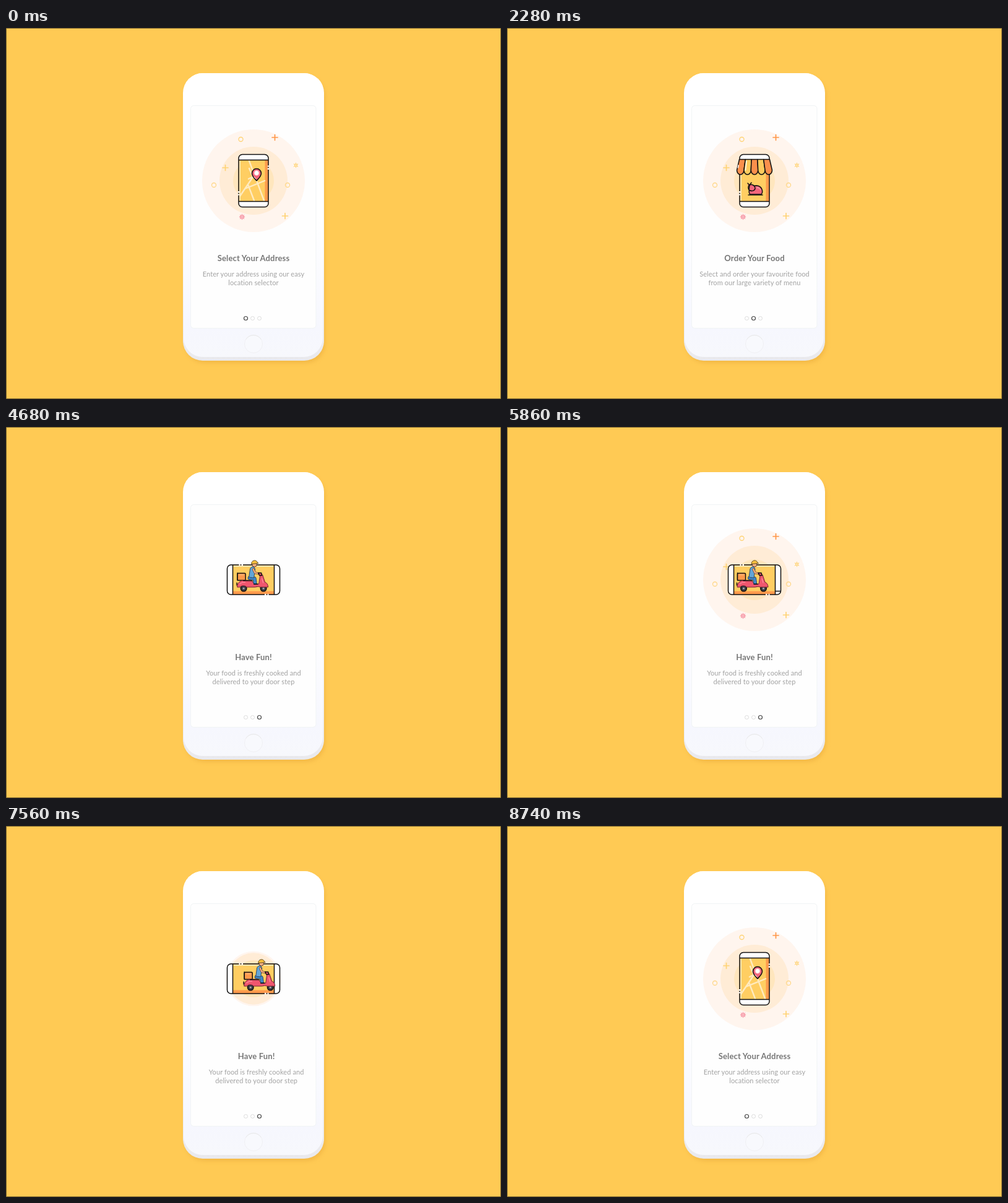
An HTML page for the animation above (10 s loop, 800 px wide and 600 px high).

```html
<!DOCTYPE html>
<html lang="en">
<head>
<meta charset="utf-8">
<title>Food onboarding</title>
<style>
html, body { margin: 0; width: 100%; height: 100%; overflow: hidden; background: #ffca54; }
svg { display: block; width: 100vw; height: 100vh; }
text { font-family: Comfortaa, Lato, sans-serif; text-anchor: middle; }
.title { font-size: 13px; font-weight: 700; fill: #777; letter-spacing: .15px; }
.body { font-size: 11px; fill: #a2a2a2; letter-spacing: .1px; }
.ink { stroke: #111; stroke-width: 1.5; stroke-linejoin: round; stroke-linecap: round; }
.line { fill: none; stroke-linecap: round; stroke-linejoin: round; }
</style>
</head>
<body>
<svg viewBox="0 0 800 600">
  <defs>
    <linearGradient id="rim" x2="0" y2="1">
      <stop offset="0" stop-color="#fff"/><stop offset=".6" stop-color="#fafafc"/><stop offset="1" stop-color="#e9e9ed"/>
    </linearGradient>
    <linearGradient id="face" x2="0" y2="1">
      <stop offset=".5" stop-color="#fff"/><stop offset=".9" stop-color="#f6f7fe"/><stop offset="1" stop-color="#f7f8fc"/>
    </linearGradient>
    <filter id="blur" x="-10%" y="-10%" width="120%" height="120%"><feGaussianBlur stdDeviation="3"/></filter>
    <clipPath id="textClip"><rect x="310" y="355" width="180" height="70"/></clipPath>
    <clipPath id="rideClip"><rect x="357" y="180" width="86" height="91"/></clipPath>
  </defs>

  <rect width="800" height="600" fill="#ffca54"/>
  <rect x=".5" y=".5" width="799" height="599" fill="none" stroke="#7d652e"/>

  <rect x="289" y="79" width="227" height="463" rx="32" fill="#e8a93a" opacity=".5" filter="url(#blur)"/>
  <rect x="286" y="73" width="228" height="465" rx="32" fill="url(#rim)"/>
  <rect x="287" y="73" width="225" height="459" rx="31" fill="url(#face)"/>
  <rect x="298.5" y="125.5" width="202.5" height="360" rx="5" fill="#fefefe" stroke="#f1f4f5"/>
  <circle cx="400" cy="511" r="14.5" fill="#f8f9fd" stroke="#f0f0f4"/>
  <path class="line" d="M388 503a14.5 14.5 0 0 1 24 0" stroke="#e9e9ea"/>

  <g id="halo">
    <circle cx="400" cy="247" fill="#fff5ee"/>
    <circle cx="400" cy="247" fill="#ffecd6"/>
    <circle cx="400" cy="247" fill="#ffe6bd"/>
  </g>
  <g id="sparks"></g>

  <g id="device">
    <rect x="-24" y="-42.5" width="48" height="85" rx="6" fill="#fff"/>
    <path d="M-24-33H24V33H-24z" fill="#ffce62"/>
    <path d="M18.500-33H24V33H18.500z" fill="#ff9a4c"/>
    <path d="M-22-32V32" stroke="#fff0cf" stroke-width="1.500"/>
    <path id="roads" class="line" stroke="#ffebc0" stroke-width="2.400" stroke-linecap="butt"
      d="M-7-32L17 32M-22 25L-1-6L-7-20M-14 13L18 0M-9 6L1 32M2-8L-8-3"/>
    <g class="ink" fill="none">
      <rect x="-24" y="-42.500" width="48" height="85" rx="6"/>
      <path d="M-23.500-33.500H23.500M-23.500 33.500H23.500"/>
    </g>
    <path d="M-24 17v2.500M-24 21.500v2M24-18v-2.500M24-22.500v-2" stroke="#fff" stroke-width="2.600"/>
  </g>

  <g id="pin">
    <path class="ink" fill="#f4667c" d="M405 247c-3-3.500-7.500-7-7.500-12a7.500 7.500 0 0 1 15 0c0 5-4.500 8.500-7.500 12z"/>
    <circle cx="405" cy="234.500" r="4" fill="#fff" stroke="#f9a9b4"/>
    <path class="line" d="M401 241l3 3" stroke="#fff" stroke-width="1"/>
  </g>

  <g id="awning" class="ink"></g>

  <g id="roast">
    <path class="ink" fill="#f4667c" d="M392 268c-2-4 0-9 5-11c5-4 13-2 15 4c1 3 1 6-1 8h-18z"/>
    <path class="ink" fill="#f4667c" d="M391 262c-2-4-1-7 1-8l-3-3m3 3l3-4m-3 4c4-2 9 1 9 5c0 4-5 6-10 3z"/>
    <path class="ink" d="M390 270H413" fill="none"/>
    <path class="line" d="M404 258c3 0 5 2 6 4" stroke="#ffc0c8"/>
  </g>

  <g clip-path="url(#rideClip)">
    <path id="dash" class="ink" d="M0 265.500h11"/>
    <g id="scooter">
      <path class="ink" fill="none" d="M374.500 236v12M373.500 252v4" stroke-width="1"/>
      <rect class="ink" x="374.500" y="236.500" width="13" height="11.500" rx="1.500" fill="#ff9a4c"/>
      <path d="M377 239h8" stroke="#ffc48d"/>
      <g fill="#3c3a44" class="ink"><circle cx="384.500" cy="261" r="4.800"/><circle cx="416.500" cy="261" r="4.800"/></g>
      <g fill="#aaa"><circle cx="384.500" cy="261" r="1.600"/><circle cx="416.500" cy="261" r="1.600"/></g>
      <path d="M374 259c0-7 5-11 11-11h12l5 6h7l2-14l4-1l4 12c3 1 5 4 5 8h-13l-3-1l-5 1h-14c-1-3-9-3-10 0z"
        fill="#f0566e" stroke="#6e2533" stroke-linejoin="round"/>
      <path d="M378 254q4-4 9-3M414 245l2 7" class="line" stroke="#ff9fae"/>
      <path d="M384 248.500h14" class="ink"/>
      <path class="line" stroke="#233c5c" stroke-width="6" d="M394 244l8 1l1 7"/>
      <path class="line" stroke="#3f86c4" stroke-width="4.500" d="M394 244l8 1l1 7"/>
      <path d="M401 254h6" class="ink" stroke-width="2.200"/>
      <path d="M393 243l2-14q2-4 6-3l2 4l-2 14z" fill="#62a5d8" stroke="#334a60"/>
      <path class="line" d="M400 230l3 6l6 1" stroke="#6a402b" stroke-width="3.600"/>
      <path class="line" d="M400 230l3 6l6 1" stroke="#f6b184" stroke-width="2.200"/>
      <path class="ink" d="M408 236h5l1 4h-4z" fill="#f0566e" stroke-width="1"/>
      <circle cx="402" cy="222.500" r="3.700" fill="#f6b184" stroke="#5a3a2b"/>
      <path d="M397 221.500c0-7 9-7 9.500-2.500l2 1.500z" fill="#ffc23e" stroke="#5e4a20"/>
    </g>
  </g>

  <g id="texts" clip-path="url(#textClip)"></g>
  <g id="dots" fill="none"></g>
</svg>
<script>
const $ = id => document.getElementById(id);
const LOOP = 10000;

// Symmetric power easing from 0 to 1 between two times.
function ramp(t, start, length, power = 2) {
  const u = Math.min(1, Math.max(0, (t - start) / length));
  return u < .5 ? Math.pow(2 * u, power) / 2 : 1 - Math.pow(2 - 2 * u, power) / 2;
}
const show = (el, on) => el.setAttribute('visibility', on ? 'visible' : 'hidden');
function zoom(el, x, y, s) {
  show(el, s > .001);
  el.setAttribute('transform', `translate(${x} ${y}) scale(${s}) translate(${-x} ${-y})`);
}

// Decorations: shape, centre, colour.
const YELLOW = '#ffd375';
const sparks = [
  ['ring', 379.5, 180, YELLOW], ['plus', 434.5, 177, '#ff9748'],
  ['flower', 468.5, 222, YELLOW], ['plus', 354.5, 226, YELLOW],
  ['ring', 336, 254, '#ffd88a'], ['ring', 455, 254, '#ffd88a'],
  ['star', 381.5, 305.5, '#f58a9c'], ['plus', 451, 304, YELLOW]
];
const shapes = {
  ring: 'M-3.5 0a3.500 3.500 0 1 0 7 0a3.500 3.500 0 1 0-7 0',
  plus: 'M-4.500 0h9M0-4.500v9',
  flower: 'M-1.600 0a1.600 1.600 0 1 0 3.200 0a1.600 1.600 0 1 0-3.200 0M0-3.500v1.500M0 3.500v-1.500M-3-2l1 .7M3-2l-1 .7M-3 2l1-.7M3 2l-1-.7',
  star: 'M0-4v2.500M0 4v-2.500M-4 0h2.500M4 0h-2.500M-2.800-2.800l1.500 1.500M2.800-2.800l-1.500 1.500M-2.800 2.800l1.500-1.500M2.800 2.800l-1.500-1.500'
};
$('sparks').innerHTML = sparks.map(([kind, x, y, color]) =>
  `<g><path class="line" transform="translate(${x} ${y})" d="${shapes[kind]}" stroke="${color}" stroke-width="${kind == 'plus' ? 1.7 : 1.3}"/></g>`).join('');

$('awning').innerHTML = [0, 1, 2, 3, 4].map(i => {
  const top = 375.5 + 9.8 * i, low = 371.5 + 11.4 * i;
  return `<path fill="${i % 2 ? '#ffcb5e' : '#fa8f4c'}" d="M${top} 212.500h9.800L${low + 11.4} 230a5.700 7 0 0 1-11.400 0z"/>`;
}).join('') + '<path d="M374 222l-.7 4M387 215l-1.500 15" stroke="#fff"/>';

// In start, in length, in offset, out start, out length, out offset.
const pages = [
  { copy: ['Select Your Address', 'Enter your address using our easy', 'location selector'],
    move: [8015, 435, -180, 10780, 350, -180] },
  { copy: ['Order Your Food', 'Select and order your favourite food', 'from our large variety of menu'],
    move: [1170, 350, 180, 3400, 435, -180] },
  { copy: ['Have Fun!', 'Your food is freshly cooked and', 'delivered to your door step'],
    move: [4220, 435, 180, 7480, 435, 180] }
];
$('texts').innerHTML = pages.map(({ copy: [title, one, two] }) =>
  `<g><text class="title" x="400" y="377">${title}</text><text class="body" x="400" y="401.500">${one}</text><text class="body" x="400" y="415.500">${two}</text></g>`).join('');
$('dots').innerHTML = pages.map((_, i) => `<circle cx="${387.5 + 11 * i}" cy="469.500" r="3"/>`).join('');

// Halo collapse and regrowth times.
const pulses = [[780, 1660], [4000, 5220], [7310, 8120]];
const radii = [83, 55, 33];
const pulse = (t, outDelay, outTime, inDelay, inTime) => pulses.reduce((s, [out, back]) =>
  s - ramp(t, out + outDelay, outTime) + ramp(t, back + inDelay, inTime), 1);

function draw(t) {
  const late = t < 780 + 740 ? t + LOOP : t;   // first page spans the loop seam

  [...$('halo').children].forEach((c, i) =>
    c.setAttribute('r', Math.max(0, radii[i] * pulse(t, 70 * i, 520, 70 * (2 - i), 400))));
  [...$('sparks').children].forEach((g, i) =>
    zoom(g, sparks[i][1], sparks[i][2], Math.max(0, pulse(t, 10 * i, 180, 200 + 15 * i, 310))));

  const turn = 90 * (ramp(t, 3450, 470) - ramp(t, 7780, 440));
  $('device').setAttribute('transform', `translate(400 247) rotate(${turn})`);

  const map = ramp(late, 8170, 300) - ramp(late, 10780, 280);
  $('roads').setAttribute('opacity', map);
  zoom($('pin'), 405, 247, map);
  const shop = ramp(t, 1100, 400) - ramp(t, 3400, 300);
  zoom($('awning'), 400, 213, shop);
  zoom($('roast'), 401, 260, ramp(t, 1200, 320) - ramp(t, 3400, 300));

  const riding = t > 4050 && t < 7820;
  const sway = t > 4650 ? -2 * Math.sin((t - 4650) * 2 * Math.PI / 968) : 0;
  const x = 72 * (ramp(t, 4050, 600) - 1) + sway + 60 * ramp(t, 7450, 370);
  show($('scooter'), riding);
  $('scooter').setAttribute('transform', `translate(${x} 0)`);
  show($('dash'), t > 4700 && t < 7450);
  const flow = (t - 4660 + 240) % 800 / 800;
  $('dash').setAttribute('transform', `translate(${434 - 54 * ((flow + .2) % 1)} 0)`);

  pages.forEach(({ move: [a, al, from, b, bl, to] }, i) => {
    const now = i ? t : late;
    const shift = from * (1 - ramp(now, a, al, 3)) + to * ramp(now, b, bl, 3);
    const g = $('texts').children[i];
    show(g, now > a && now < b + bl);
    g.setAttribute('transform', `translate(${shift} 0)`);
  });

  const active = t < 1150 || t >= 8000 ? 0 : t < 4430 ? 1 : 2;
  [...$('dots').children].forEach((c, i) => {
    c.setAttribute('stroke', i == active ? '#484848' : '#dcdcdc');
    c.setAttribute('stroke-width', i == active ? 1.2 : 1);
  });
}

function frame() {
  draw(performance.now() % LOOP);
  requestAnimationFrame(frame);
}
frame();
</script>
</body>
</html>
```
